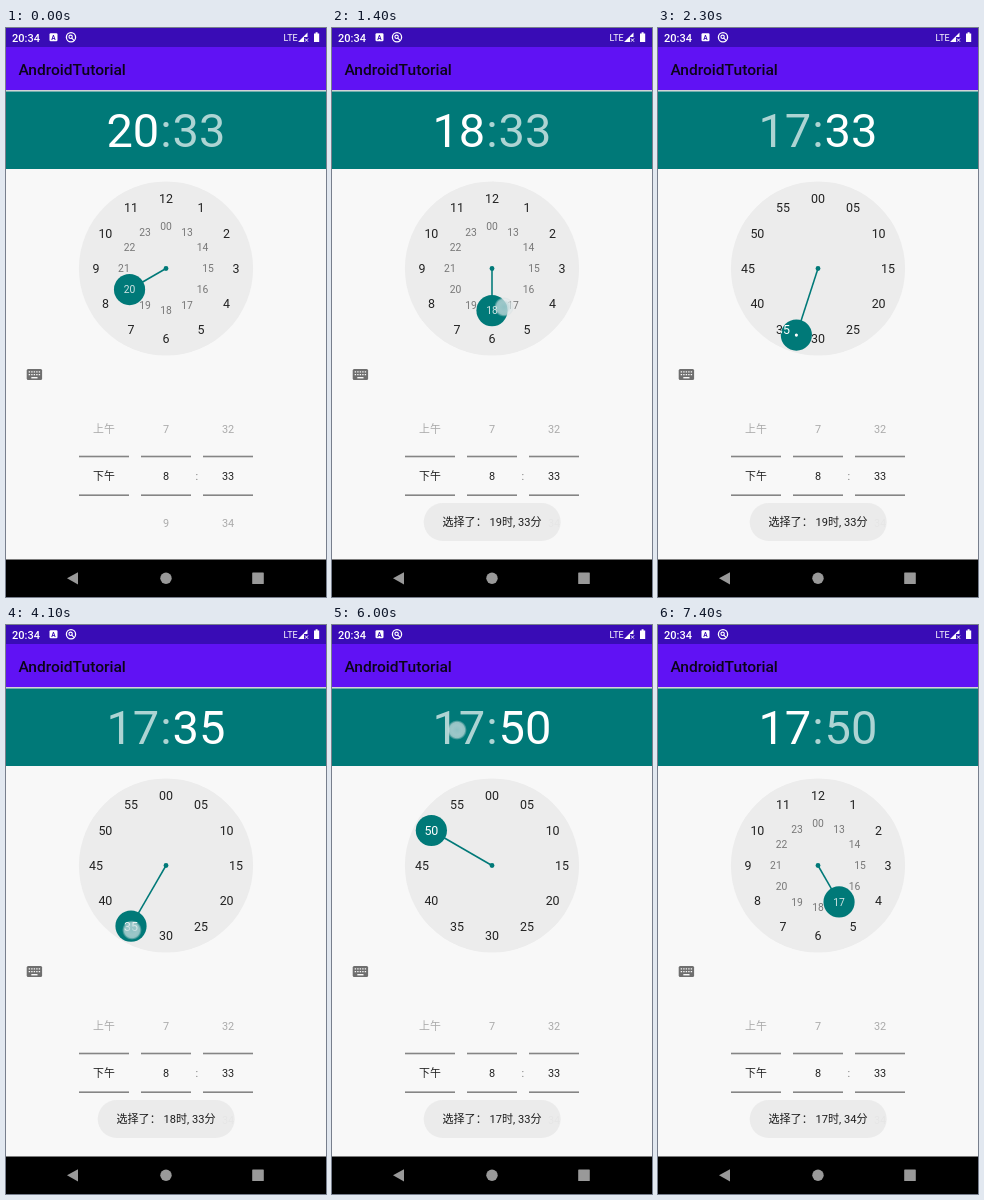
These frames come from a looping animation (320 by 569 pixels, 8 s). An HTML page:

```html
<!DOCTYPE html>
<html lang="zh-CN">
<head>
<meta charset="utf-8">
<title>Time picker</title>
<style>
  html, body { margin: 0; width: 100%; height: 100%; overflow: hidden; background: #f8f8f8; }
  svg { display: block; width: 100%; height: 100%; font-family: Roboto, "Noto Sans CJK SC", "Noto Sans CJK", sans-serif; }
  .mid { text-anchor: middle; }
  .big { font-size: 47px; fill: #fff; }
  .dim { fill-opacity: .68; }
  .wheel { font-size: 10.9px; fill: #222; }
  .wheel .off { fill: #aaa; }
  .toast { font-size: 11.1px; fill: #1c1c1c; }
</style>
</head>
<body>
<svg id="stage" viewBox="0 0 320 569">
  <defs>
    <radialGradient id="glow">
      <stop offset="0" stop-color="#a9cfd2" stop-opacity=".85"/>
      <stop offset=".5" stop-color="#c3dadd" stop-opacity=".8"/>
      <stop offset=".78" stop-color="#e2eaec" stop-opacity=".65"/>
      <stop offset="1" stop-color="#bcd0d3" stop-opacity=".1"/>
    </radialGradient>
    <clipPath id="knobClip"><circle id="clip" r="15.6"/></clipPath>
  </defs>

  <rect width="320" height="569" fill="#f8f8f8"/>

  <!-- status bar and app bar -->
  <rect width="320" height="19" fill="#390cb6"/>
  <rect y="19" width="320" height="43" fill="#6012f4"/>
  <rect y="62" width="320" height="1.5" fill="#d3d3d6"/>
  <g fill="#fff">
    <text x="6" y="13.6" font-size="11" font-weight="500">20:34</text>
    <rect x="43.5" y="5.3" width="8" height="8" rx="1.2"/>
    <text class="mid" x="47.5" y="11.7" font-size="6.5" font-weight="700" fill="#390cb6">A</text>
    <circle cx="65" cy="9.3" r="4.6" fill="none" stroke="#fff" stroke-width="1.3"/>
    <circle cx="64.6" cy="8.8" r="1.7" fill="none" stroke="#fff" stroke-width="1.1"/>
    <path d="M65.5 9.8 68.3 12.6" stroke="#fff" stroke-width="1.2"/>
    <text x="277.5" y="13" font-size="9">LTE</text>
    <path d="M292 14 301.5 4.5V9H298V14Z"/>
    <path d="M299 10.5 302 13.7M302 10.5 299 13.7" stroke="#fff"/>
    <path d="M308 5.6H309.6V4.3H311.6V5.6H313.2V14H308Z"/>
  </g>
  <text x="12.4" y="46.6" font-size="15.56" font-weight="500" fill="#0b0418">AndroidTutorial</text>

  <!-- time header -->
  <rect y="63.5" width="320" height="77.5" fill="#007978"/>
  <text id="hour" class="big" x="153.3" y="119.3" text-anchor="end"></text>
  <text class="big dim mid" x="160" y="119.3">:</text>
  <text id="minute" class="big" x="166.5" y="119.3"></text>

  <!-- dial -->
  <circle cx="160" cy="240.5" r="87.1" fill="#ececec"/>
  <g id="labels"></g>
  <path id="hand" stroke="#007978" stroke-width="1.56"/>
  <circle cx="160" cy="240.5" r="2.4" fill="#007978"/>
  <circle id="knob" r="15.6" fill="#007978"/>
  <g id="litLabels" clip-path="url(#knobClip)"></g>
  <circle id="dot" fill="#fff"/>

  <!-- keyboard icon -->
  <rect x="20.7" y="341" width="15.4" height="11" rx="1.5" fill="#6f6f6f"/>
  <path d="M22.7 343.9H34.2M22.7 346.6H34.2" stroke="#f8f8f8" stroke-width="1.4" stroke-dasharray="1.4 1.1"/>
  <path d="M25.3 349.7H31.5" stroke="#f8f8f8" stroke-width="1.4"/>

  <g id="wheels" class="wheel mid"></g>
  <g id="toasts"></g>

  <!-- navigation bar -->
  <rect y="531.5" width="320" height="37.5" fill="#000"/>
  <g fill="#999">
    <path d="M61 550.3 72 544.2V556.4Z"/>
    <circle cx="160" cy="550.3" r="5.7"/>
    <rect x="246.2" y="544.5" width="11.6" height="11.6" rx=".6"/>
  </g>

  <circle id="touch" r="9.8" fill="url(#glow)"/>
</svg>

<script>
const LOOP = 8000, STEP = 100, CX = 160, CY = 240.5;
const OUTER = 70, INNER = 42.1, KNOB = 15.6;
const $ = id => document.getElementById(id);

const set = (node, attrs) => {
  for (const key in attrs) node.setAttribute(key, attrs[key]);
  return node;
};
const add = (parent, tag, attrs, text = '') => {
  const node = document.createElementNS('http://www.w3.org/2000/svg', tag);
  node.textContent = text;
  return parent.appendChild(set(node, attrs));
};
const lerp = (a, b, p) => a + (b - a) * p;
const ramp = (t, a, b) => Math.min(1, Math.max(0, (t - a) / (b - a)));
const ease = p => (1 - Math.cos(Math.PI * p)) / 2;
const pad = n => String(n).padStart(2, '0');
const polar = (deg, r) => {
  const a = deg * Math.PI / 180;
  return [CX + r * Math.sin(a), CY - r * Math.cos(a)];
};

function ring(parent, r, size, fill, label) {
  for (let i = 0; i < 12; i++) {
    const [x, y] = polar(i * 30, r);
    add(parent, 'text', { x, y: y + size * .355, 'font-size': size, fill, class: 'mid' }, label(i));
  }
}

function dialLabels(parent, dark, grey) {
  const hours = add(parent, 'g', {}), minutes = add(parent, 'g', {});
  ring(hours, OUTER, 12.45, dark, i => i || 12);
  ring(hours, INNER, 10.3, grey, i => i ? i + 12 : '00');
  ring(minutes, OUTER, 12.45, dark, i => pad(i * 5));
  return { hours, minutes };
}
const labelSets = [
  dialLabels($('labels'), '#222', '#777'),
  dialLabels($('litLabels'), '#fff', '#cfe4e4')
];

const wheels = [[98, ['上午', '下午', '']], [160, [7, 8, 9]], [222, [32, 33, 34]]];
for (const [x, items] of wheels) {
  items.forEach((item, i) =>
    add($('wheels'), 'text', { x, y: 405.3 + i * 47, class: i === 1 ? '' : 'off' }, item));
  for (const y of [427.7, 466.4])
    add($('wheels'), 'rect', { x: x - 25, y, width: 50, height: 1.6, fill: '#858585' });
}
add($('wheels'), 'text', { x: 190.8, y: 451.5, fill: '#777' }, ':');

const toasts = [[900, 19, 33], [3000, 18, 33], [5000, 17, 33], [7000, 17, 34]].map(([start, h, m]) => {
  const node = add($('toasts'), 'g', { class: 'toast' });
  add(node, 'rect', { x: 91.7, y: 475, width: 137, height: 38, rx: 19, fill: '#ebebeb', 'fill-opacity': .92 });
  add(node, 'text', { x: 110.4, y: 498.2 }, `选择了： ${h}时, ${m}分`);
  return { start, node };
});

// finger contacts: each is a list of [time, x, y]
const sweep = [0, .25, .5, .75, 1].map(p =>
  [lerp(4100, 4800, p), ...polar(lerp(207.8, 305.3, p), lerp(73, 65, p))]);
const contacts = [
  [[500, 123, 262], [700, 125, 265], [900, 139, 277], [1200, 156, 283],
   [1400, 172, 279], [1600, 180, 278], [1800, 180, 278]],
  [...sweep, [5100, 107, 203]],
  [[6000, 125, 105], [6100, 125, 105]]
];

function touchAt(t) {
  const path = contacts.find(c => t >= c[0][0] && t < c[c.length - 1][0]);
  if (!path) return null;
  const i = path.findIndex(k => k[0] > t);
  const a = path[i - 1], b = path[i], p = ramp(t, a[0], b[0]);
  return [lerp(a[1], b[1], p), lerp(a[2], b[2], p)];
}

const hourAt = t => t < 800 ? 20 : t < 1200 ? 19 : t < 1500 ? 18 : 17;
const minuteAt = t => t < 4100 ? 33 : Math.round(lerp(35, 50, ramp(t, 4100, 4800)));

function draw(t) {
  const hour = hourAt(t), minute = minuteAt(t);
  const editMinutes = t >= 1800 && t < 6100;
  const mix = t < 6100 ? ease(ramp(t, 1800, 2300)) : 1 - ease(ramp(t, 6100, 6600));

  $('hour').textContent = hour;
  $('minute').textContent = pad(minute);
  $('hour').classList.toggle('dim', editMinutes);
  $('minute').classList.toggle('dim', !editMinutes);

  for (const { hours, minutes } of labelSets) {
    set(hours, { opacity: 1 - mix });
    set(minutes, { opacity: mix });
  }

  const angle = lerp(hour * 30 - 360, minute * 6, mix);
  const reach = lerp(INNER, OUTER, mix);
  const [cx, cy] = polar(angle, reach);
  set($('knob'), { cx, cy });
  set($('clip'), { cx, cy });
  set($('dot'), { cx, cy, r: minute % 5 ? 1.56 * mix : 0 });
  set($('hand'), { d: `M${CX} ${CY}L${polar(angle, reach - KNOB + 1)}` });

  toasts.forEach(({ start, node }, i) => {
    const next = toasts[i + 1];
    const gone = next && t >= next.start + 400;
    set(node, { opacity: gone ? 0 : ramp(t, start, start + 400) });
  });

  const touch = touchAt(t);
  set($('touch'), touch ? { cx: touch[0], cy: touch[1], opacity: 1 } : { opacity: 0 });
}

// the screen refreshes ten times a second
const begin = performance.now();
function tick() {
  const t = (performance.now() - begin) % LOOP;
  draw(Math.floor(t / STEP) * STEP);
  requestAnimationFrame(tick);
}
tick();
</script>
</body>
</html>
```
